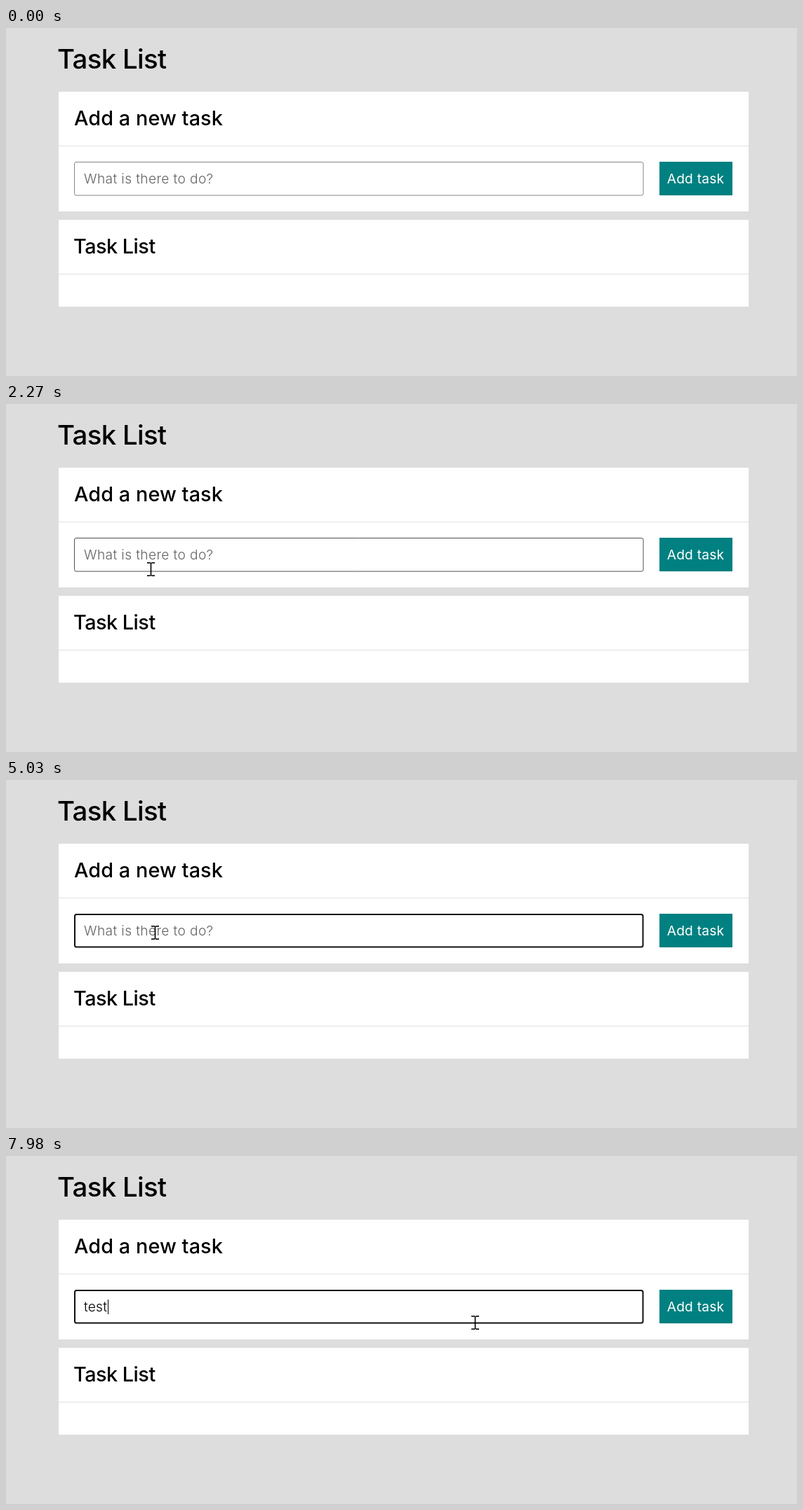
Animation of 1127 by 497 pixels, one loop 8000 ms. Source, as an HTML page with a canvas:

```html
<!DOCTYPE html>
<html lang="en">
<head>
<meta charset="utf-8">
<title>Task List</title>
<style>
  html, body { margin: 0; width: 100%; height: 100%; overflow: hidden; background: #ddd; }
  canvas { display: block; width: 1127px; height: 497px; }
</style>
</head>
<body>
<canvas id="stage" width="1127" height="497"></canvas>
<script>
const ctx = document.getElementById('stage').getContext('2d');
const LOOP = 8000;
const BLINK = 532;
const FOCUS = 3360;

// [time, x, y] of the pointer hotspot
const approach = [[1460, 172, 438], [1600, 175, 362], [1800, 182, 291], [2000, 192, 263],
  [2210, 202, 242], [2270, 206, 236], [2410, 209, 227], [2690, 212, 218]];
const leave = [[7700, 212, 218], [7770, 232, 224], [7840, 352, 236], [7910, 540, 241], [7980, 668, 238]];

// [time, text, caret x]
const typing = [[FOCUS, '', 111], [5500, 't', 118], [5630, 'te', 129], [6100, 'tes', 138], [6440, 'test', 145]];

function along(path, t) {
  const last = path[path.length - 1];
  if (t >= last[0]) return { x: last[1], y: last[2] };
  const i = Math.max(1, path.findIndex(p => p[0] > t));
  const [t0, x0, y0] = path[i - 1], [t1, x1, y1] = path[i];
  const k = Math.max(0, (t - t0) / (t1 - t0));
  return { x: Math.round(x0 + (x1 - x0) * k), y: Math.round(y0 + (y1 - y0) * k) };
}

// The pointer moves in visible steps, about 15 a second.
function stepped(t, start, step) {
  return start + Math.floor((t - start) / step) * step;
}

function pointerAt(t) {
  if (t < 1460) return null;
  if (t < 2270) return along(approach, stepped(t, 1460, 68));
  if (t < 7770) return along(approach, stepped(t, 2270, 70));
  return along(leave, stepped(t, 7770, 70));
}

function rect(x, y, w, h, color) {
  ctx.fillStyle = color;
  ctx.fillRect(x, y, w, h);
}

function text(str, x, y, size, weight, color, spacing = 0) {
  ctx.font = `${weight} ${size}px Inter, "Open Sans", sans-serif`;
  ctx.letterSpacing = `${spacing}px`;
  ctx.fillStyle = color;
  ctx.fillText(str, x, y);
}

function card(title, x, top, height, spacing) {
  rect(75, top, 983, height, '#fff');
  rect(75, top + 77, 983, 1, '#e1e1e1');
  text(title, x, top + 48, 28.8, 500, '#000', spacing);
}

function field(color, width) {
  const inset = width / 2;
  ctx.beginPath();
  ctx.roundRect(97 + inset, 191 + inset, 811.5 - width, 48.5 - width, 2.5);
  ctx.strokeStyle = color;
  ctx.lineWidth = width;
  ctx.stroke();
}

function arrow({ x, y }) {
  ctx.save();
  ctx.translate(x + 0.5, y + 0.5);
  ctx.scale(1.1, 1.1);
  ctx.beginPath();
  for (const [px, py] of [[0, 0], [0, 16.5], [3.8, 13], [6.3, 18.6], [8.8, 17.5], [6.4, 12], [11.6, 12]]) {
    ctx.lineTo(px, py);
  }
  ctx.closePath();
  ctx.fillStyle = '#fff';
  ctx.strokeStyle = '#000';
  ctx.lineWidth = 0.95;
  ctx.fill();
  ctx.stroke();
  ctx.restore();
}

function beam({ x, y }) {
  for (const serifY of [y - 10, y + 8.4]) {
    rect(x - 5, serifY, 5, 1.6, '#000');
    rect(x + 1, serifY, 5, 1.6, '#000');
  }
  rect(x - 0.3, y - 9, 1.6, 18, '#000');
}

function clickGlow() {
  ctx.beginPath();
  ctx.arc(211, 217, 13.5, 0, Math.PI * 2);
  ctx.fillStyle = 'rgba(255, 240, 10, 0.6)';
  ctx.fill();
}

function draw(t) {
  rect(0, 0, 1127, 497, '#ddd');
  text('Task List', 73, 58, 38.4, 500, '#000', -0.7);
  card('Add a new task', 97, 91, 171, 0.08);
  card('Task List', 96, 274, 124, -0.5);

  const pointer = pointerAt(t);
  const inField = pointer && pointer.y < 240;
  const focused = t >= FOCUS;
  rect(931, 191, 104, 48, '#008080');
  ctx.textAlign = 'center';
  text('Add task', 982.5, 222, 19.2, 400, '#fff', 0.2);
  ctx.textAlign = 'left';

  if (focused) field('#101010', 2);
  else field(inField ? '#4f4f4f' : '#858585', 1);

  const [since, typed, caretX] = typing.filter(k => k[0] <= t).pop() || [0, '', 111];
  if (typed) text(typed, 111, 222, 19.2, 300, '#000', 0.2);
  else text('What is there to do?', 111, 222, 19.2, 300, '#626262', 0.36);

  if (focused && Math.floor((t - since + 3) / BLINK) % 2 === 0) rect(caretX, 205, 1, 21, '#000');
  if (t >= FOCUS && t < 3490) clickGlow();
  if (pointer) (inField ? beam : arrow)(pointer);
}

function frame() {
  draw(performance.now() % LOOP);
  requestAnimationFrame(frame);
}
frame();
</script>
</body>
</html>
```
